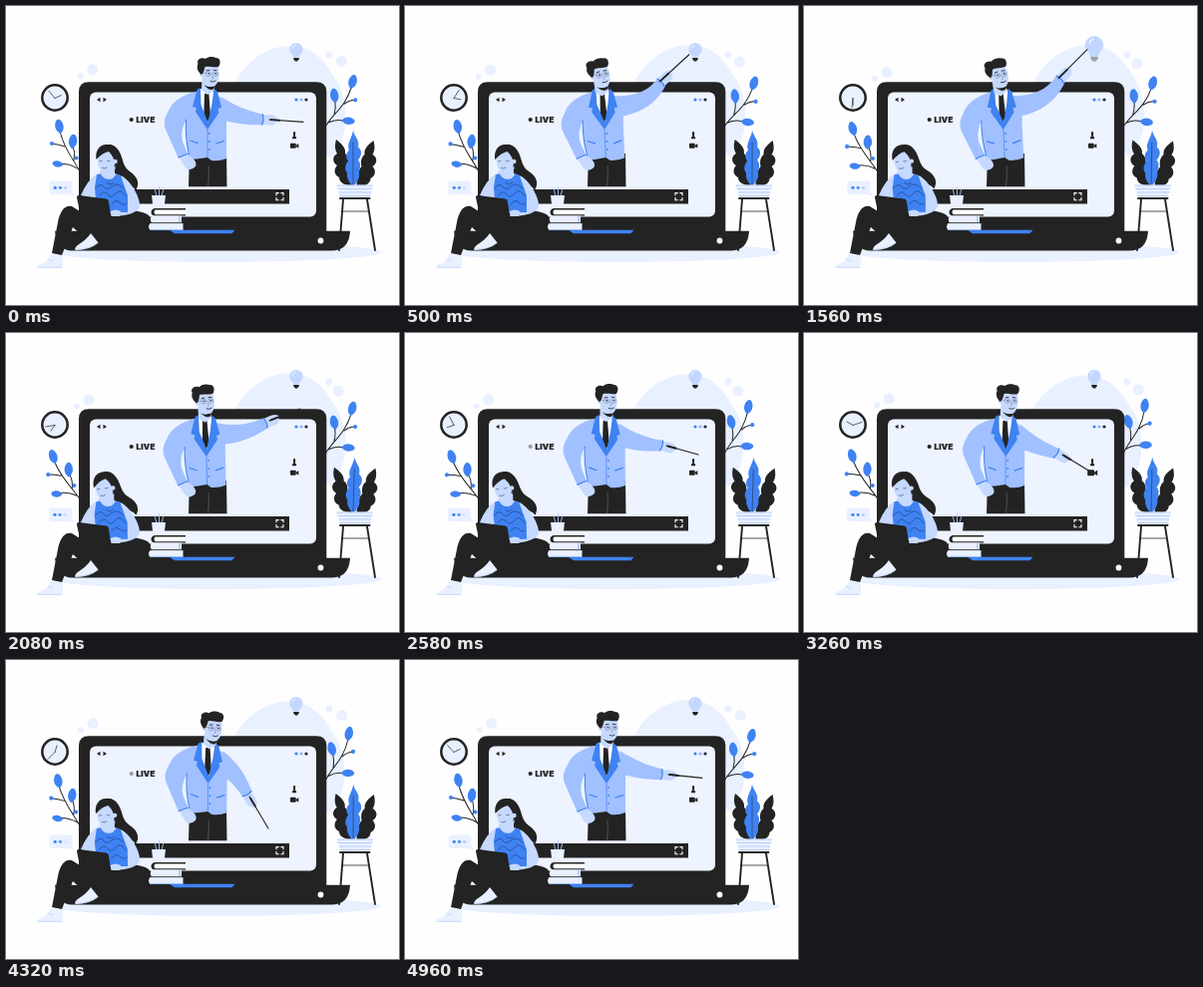
These frames come from a looping animation (394 px wide and 300 px high, 4.98 s). An HTML page:

```html
<!DOCTYPE html>
<html lang="en">
<head>
<meta charset="utf-8">
<title>Live lesson</title>
<style>
  html, body { margin: 0; width: 100%; height: 100%; overflow: hidden; background: #fefeff; }
  svg { display: block; width: 394px; height: 300px; }
  .ink { fill: #232323; } .blue { fill: #3f82f2; } .coat { fill: #a1c0ff; }
  .skin { fill: #c6d9ff; } .pale { fill: #e9f0ff; } .white { fill: #fff; }
  .line { fill: none; stroke: #232323; stroke-linecap: round; stroke-linejoin: round; }
  .trim { fill: none; stroke: #3f82f2; stroke-linecap: round; }
  .soft { stroke: #a3c0fb; }
  text { font: 900 8px Inter, Roboto, sans-serif; letter-spacing: .25px; stroke: #232323; stroke-width: .2; }
</style>
</head>
<body>
<svg viewBox="0 0 394 300">
  <defs>
    <path id="leaf" d="M0 7.200C-5.500 3.500-5-3-1.700-6.800Q0-8 1.700-6.800C5-3 5.500 3.500 0 7.200Z"/>
    <path id="spike" d="M0 0C1 7 7 9 5 17C10 21 8 27 5 30C9 35 6 39 6 43C7 49 3 53 0 57C-3 53-7 49-6 43C-9 39-8 35-5 31C-8 27-7 23-4 20C-7 14-1 8 0 0Z"/>
    <path id="frond" d="M331 134C336 138 341 142 340 148C344 151 344 157 343 160C347 164 348 172 348 181C341 180 334 178 334 172C328 169 329 163 332 160C326 156 328 150 332 148C329 143 330 138 331 134Z"/>
  </defs>

  <!-- backdrop -->
  <g class="pale">
    <path id="blob" d="M227 82C239 55 262 40 285 40C312 41 322 60 332 76C343 94 346 132 325 153L300 120Z"/>
    <ellipse cx="211" cy="247" rx="165" ry="10"/>
    <g id="bubL"><circle r="5.500"/><circle cx="-12" cy="6.500" r="3"/></g>
    <circle cx="324" cy="49" r="3.400"/>
    <circle id="bubR" r="5.500"/>
  </g>

  <!-- bulb -->
  <g id="bulb">
    <path fill="#c3d6ff" d="M288 51.500C288 48.500 284.400 47.500 284.400 43.500A6.600 6.600 0 0 1 297.600 43.500C297.600 47.500 294 48.500 294 51.500Z"/>
    <path d="M287.500 42.500Q288 39.500 290.500 39.300" fill="none" stroke="#fff" stroke-width=".8"/>
    <path id="cap" class="ink" d="M288.300 52H293.700V53.500L292 55.400H290L288.300 53.500Z"/>
  </g>

  <!-- clock -->
  <circle class="pale" cx="49" cy="92" r="12.700" stroke="#232323" stroke-width="2.500"/>
  <g class="line" stroke-width=".65">
    <path id="hour" d="M49 92.500V85.500"/>
    <path id="minute" d="M49 92.500V83"/>
  </g>

  <!-- sprigs -->
  <g id="sprigL" class="blue">
    <path class="line" stroke-width="1" d="M76 171C71 157 60 148 54 126M68 155Q70 147 67 140M59 141Q53 139 46 138M72 163Q64 158 55 158"/>
    <use href="#leaf" transform="translate(53.500 121) rotate(-10)"/>
    <use href="#leaf" transform="translate(67 136) rotate(8)"/>
    <use href="#leaf" transform="translate(52 158.500) rotate(-78) scale(.75)"/>
    <circle cx="46" cy="138" r="2.100"/><circle cx="70.500" cy="152.500" r="2"/>
  </g>
  <g id="sprigR" class="blue">
    <path class="line" stroke-width="1" d="M318 125C326 108 339 104 346 81M329 108Q331 100 329 94M339 98Q344 94 350 94M323 117Q331 113 338 115"/>
    <use href="#leaf" transform="translate(347 76) rotate(14)"/>
    <use href="#leaf" transform="translate(329 90) rotate(-10)"/>
    <use href="#leaf" transform="translate(343 115) rotate(95) scale(.9)"/>
    <circle cx="350" cy="94" r="2.100"/>
  </g>

  <!-- potted plant and stool -->
  <g id="fernL"><use class="ink" href="#frond"/></g>
  <g id="fernR"><use class="ink" href="#frond" transform="translate(699.500 1) scale(-1 1)"/></g>
  <g id="fernM">
    <use class="blue" href="#spike" transform="translate(348 124.500)"/>
    <path class="line" stroke-width=".5" d="M348 137V180"/>
  </g>
  <path class="pale" d="M331.500 179.500H368V183.500H366.500L365 193H335L333.500 183.500H331.500Z"/>
  <path class="trim soft" stroke-width=".7" d="M332 180H367.500M333 183.500H366.500M334 187H366M335 190.500H365"/>
  <path class="line" stroke-width="1.900" d="M335 193H364.500M338 194L334 245M362 194L370 245"/>
  <path class="line" stroke-width=".8" d="M337 206H363.500"/>

  <!-- laptop -->
  <path class="ink" d="M73 228V86Q73 76.200 83 76.200H311Q321.300 76.200 321.300 86V228Z"/>
  <path class="ink" d="M49 225.700H345Q344 245.500 326 245.500H66Q52 245.500 49 225.700Z"/>
  <rect x="84" y="86.500" width="227" height="125" rx="6" fill="#edf3ff"/>
  <path class="blue" d="M164 224.700H229.500L226.500 228.200H169Z"/>
  <circle class="white" cx="315.500" cy="235.500" r="2.900"/>
  <g class="ink">
    <path d="M94.500 91.800V96.200L91 94ZM97.500 91.800V96.200L101 94Z"/>
    <circle id="rec" cx="125.700" cy="114" r="2.100"/>
    <text x="130.500" y="117">LIVE</text>
    <circle cx="301" cy="94" r="1.600"/>
    <circle class="blue" cx="291" cy="94" r="1.600"/>
    <circle cx="296" cy="94" r="1.600" fill="#8fb4fb"/>
    <rect x="106" y="184" width="178" height="14.500"/>
    <rect x="288" y="126" width="2.100" height="5" rx="1"/>
    <path d="M287 131.500Q289 130 291.100 131.500V133.300H287Z"/>
    <g id="cam"><rect x="285" y="137.700" width="5.700" height="5" rx=".8"/><path d="M290.500 140L293.300 138V142.600L290.500 141Z"/></g>
  </g>
  <path d="M271 190.300V187.600H273.700M275.400 187.600H278V190.300M278 192V194.700H275.400M273.700 194.700H271V192" fill="none" stroke="#fff" stroke-width="1.100"/>

  <!-- teacher -->
  <path class="ink" d="M184 148H221L221.500 181.300H183Z"/>
  <path d="M203 160Q204 169 202.500 181.300" fill="none" stroke="#65708a" stroke-width=".6"/>
  <path id="sleeve" class="coat"/>
  <g id="torso">
    <path class="coat" d="M190 86C178 89 167 95 163 105C159 112 157 118 161 126L173 153L182 149L181 154Q191 154 202 152L206 155Q214 156 221 153L221 118C222 107 222 97 213 90Z"/>
    <path fill="#edf3ff" d="M179.500 116Q174.500 127 177 136L182.500 149L184 150Q180 132 181 117Z"/>
    <path class="trim" stroke-width="1.100" d="M180.500 114Q179.500 132 183.500 149M173 152L182 148.500"/>
    <path class="skin" d="M174 153L182 149.500C188 152 192 157 190 161C186 165 181 165 179 161Z"/>
    <path class="white" d="M195 83L208 84L208 97L202 119L194 98Z"/>
    <path class="ink" d="M199 88H203.400L205 110L201.800 117L198.300 110Z"/>
    <path class="blue" d="M195 82L191.500 84L187 101L191 102L190 106L202 124L202.500 117L195.500 99ZM208.500 83L212 86L216 102L212.500 103L213.500 107L202 124L202.500 117L206.500 98Z"/>
    <path class="trim" stroke-width=".7" d="M202 124L202 152"/>
    <path class="trim" stroke-width="1.300" d="M185 135L192 137.500M211 138L218.500 135.500"/>
    <g class="blue"><circle cx="204" cy="128" r=".9"/><circle cx="204" cy="136" r=".9"/><circle cx="204" cy="144" r=".9"/></g>
    <g id="head">
      <path class="skin" d="M196 72L210 75L208 85L201.500 89L195.500 84Z"/>
      <path class="ink" d="M198 79Q203 83 210 79L207.500 83.500Q203 85.500 198 79Z"/>
      <path class="skin" d="M196 61C201 56 211 57 212.500 62C214 70 213 77 208.500 80.500C202 82 197 77 196 71C193 71 192 66 196 65Z"/>
      <path class="ink" d="M195.500 69C192 66 190 62 192 58C190 54 195 51 199.500 53C203 50 208 51 210 52C215 52 215 58 212.500 61C208 62 202 60 199 61C198 64 198 67 195.500 69Z"/>
      <path class="line" stroke-width=".8" d="M200.500 64.800L203.500 64.300M207.500 64.300L210.500 64.600M204.500 75.500Q207 77 209.500 75.200"/>
      <g class="line" stroke-width=".4" style="stroke:#55617d"><circle cx="202.500" cy="68" r="2.500"/><circle cx="209.300" cy="68" r="2.400"/><path d="M200 67.500L196.500 67M206 70L207.300 72.500L206 73"/></g>
      <g class="ink"><circle cx="202.800" cy="67.800" r=".8"/><circle cx="209.500" cy="67.800" r=".8"/></g>
    </g>
  </g>
  <g id="hand">
    <path class="skin" d="M-1-4.700L5-5.200Q10-5.800 13.500-3Q15.500-1 13-.5Q14.500 2 12 3Q11 5.500 8 5.200L3 5.200L-1 4.700Z"/>
    <path class="trim" stroke-width="1.300" d="M-1-5Q1 0-1 5"/>
  </g>
  <path id="rod" class="line" stroke-width="1.100"/>
  <path id="grip" class="line" stroke-width="1.900"/>

  <!-- books and pencils -->
  <g class="white">
    <path class="line" style="stroke:#a9c4fa" stroke-width=".9" d="M151 191L149 183M153.500 191V181.500M156 191L158 183"/>
    <path class="pale" d="M146 190H160L158.500 203H147.500Z"/>
    <path class="ink" d="M149 203H180V210.500H149Q145.500 210 145.500 206.700Q146 203.500 149 203Z"/>
    <path d="M149.500 204.500H180V209.200H149.500Q147.500 206.800 149.500 204.500Z"/>
    <path class="pale" d="M146 210.500H176V217.500H146Q143.500 214 146 210.500Z"/>
    <path class="pale" d="M144.500 218H177.500V225H144.500Q141.500 221.500 144.500 218Z"/>
    <path class="line" stroke-width=".6" d="M145.500 217.700H177.500"/>
    <path class="trim" stroke-width=".6" d="M145 224.700H177M174 211V217"/>
  </g>

  <!-- chat bubble -->
  <g id="chat">
    <path class="pale" d="M46 175.500H63.500Q66.500 175.500 66.500 178.500V186L69 190.500L63 189H46Q43.500 189 43.500 186.500V178.500Q43.500 175.500 46 175.500Z"/>
    <g id="dots" class="blue"><circle cx="49.300" cy="182.300" r="1.600"/><circle cx="54.500" cy="182.300" r="1.600"/><circle cx="59.700" cy="182.300" r="1.600"/></g>
  </g>

  <!-- student -->
  <path class="ink" d="M98 207C122 203 138 206 143 210C149 217 126 226 108 232L90 242L81 233L100 219Z"/>
  <path class="ink" d="M102 210L102 228C88 234 76 231 67 222L56 250L46 248L52 217C54 206 59 199 66 201L82 211Z"/>
  <path class="pale" d="M45 248.500L56.500 250.500Q58 257 56 263H32Q30 260 36 258.500Q43 255 45 248.500Z"/>
  <path class="trim soft" stroke-width=".5" d="M32 262.300H56M42 254L47 256"/>
  <path class="pale" d="M85 228L92.500 237.500Q84 245 69.500 245Q68 242 74 238.500Q81 234 85 228Z"/>
  <path class="trim soft" stroke-width=".5" d="M70 244.300Q84 244 92 238"/>
  <g id="student">
    <g id="hair"><path class="ink" d="M92 149C94 138 107 135 113 145C118 153 116 160 124 166C133 172 134 179 130 185C126 178 115 179 109 170Z"/></g>
    <path class="skin" d="M91 168.500Q82 174 75 190L90 196L95 180ZM98 161H109V168L117 171C126 177 135 193 134 201C132 209 116 211 106 211L106 206L122 201L116 186L96 180L91 170Z"/>
    <path class="blue" d="M89 182L91 169L95 168.500Q99 176 107 173L111 168.500L115 170Q119 182 122 190L122 207H91Z"/>
    <path class="line" style="stroke:#1f3f80" stroke-width=".65" d="M90 183Q94 177 98 181Q101 186 106 181T118 183M94 190Q97 184 102 189Q105 194 110 188T120 191M106 199Q110 193 114 197T121 198M101 177Q104 181 108 177"/>
    <g id="face">
      <path class="skin" d="M92 149C94 143 107 141 110 148L110 163Q103 168 97.500 167Q91 163 92 149Z"/>
      <path class="ink" d="M90.500 154C89 144 95 138 102 139C112 139 115 149 114 156C114 161 118 164 118 169Q111 168 109 159Q109 152 103 146Q97 147 90.500 154Z"/>
      <path class="line" stroke-width=".5" d="M93.800 155.500Q95 156.500 96.200 155.500M101.500 155.500Q103 156.500 104.500 155.300M96.500 162.300Q99 164 101 162"/>
      <circle class="skin" cx="109.500" cy="156" r="2.200"/>
      <circle cx="110.700" cy="160.500" r="1.900" fill="none" stroke="#232323" stroke-width=".7"/>
    </g>
  </g>
  <path class="ink" d="M73 190L100.500 193.500Q102.300 193.800 102.700 195.500L106 215.500H78Q76 215.500 75.500 213.500L71 192Q71 189.800 73 190Z"/>
  <path class="skin" d="M104.500 206Q110 203 115 206L114 211L105.500 211Z"/>
</svg>

<script>
const LOOP = 4980, TAU = Math.PI * 2;
const $ = id => document.getElementById(id);
const set = (id, name, value) => $(id).setAttribute(name, value);
const turn = (id, deg, x, y) => set(id, 'transform', `rotate(${deg} ${x} ${y})`);
const move = (id, x, y) => set(id, 'transform', `translate(${x} ${y})`);
const grow = (id, k, x, y) => set(id, 'transform', `translate(${x} ${y}) scale(${k}) translate(${-x} ${-y})`);
const clamp = x => Math.max(0, Math.min(1, x));
const smooth = x => { x = clamp(x); return x * x * (3 - 2 * x); };
const bump = (t, from, to) => Math.sin(Math.PI * clamp((t - from) / (to - from))) ** 2;

// elbow, wrist, rod start, rod tip, lean
const POSES = {
  level:  [233, 112, 258, 114, 264, 114, 298, 116.5, 0],
  bulb:   [244, 99, 257, 72, 254, 72, 283, 42, -10],
  lower:  [236, 104, 261, 90, 264, 88, 295, 76, -5],
  across: [232, 112, 258, 113, 262, 113, 294, 122, -1],
  camera: [230, 114, 254, 121, 259, 122, 287, 139, 1],
  rest:   [231, 112, 242, 135, 244, 137, 263, 169, 3]
};
const KEYS = [
  [0, 'level'], [640, 'bulb'], [1450, 'bulb'], [2080, 'lower'], [2580, 'across'],
  [3000, 'camera'], [3400, 'camera'], [4120, 'rest'], [4340, 'rest']
].map(([t, name]) => ({ t, v: POSES[name] }));

function keyAt(i) {
  const n = KEYS.length, k = KEYS[(i + n) % n];
  return { t: k.t + Math.floor(i / n) * LOOP, v: k.v };
}

// slope that never overshoots a key
function slope(i, c) {
  const a = keyAt(i - 1), b = keyAt(i), d = keyAt(i + 1);
  const l = (b.v[c] - a.v[c]) / (b.t - a.t), r = (d.v[c] - b.v[c]) / (d.t - b.t);
  return l * r <= 0 ? 0 : 2 * l * r / (l + r);
}

function poseAt(t) {
  let i = KEYS.length - 1;
  while (KEYS[i].t > t) i--;
  const a = keyAt(i), b = keyAt(i + 1), h = b.t - a.t, u = (t - a.t) / h;
  return a.v.map((p, c) => {
    const q = b.v[c], s = u * u * (3 - 2 * u);
    return p + (q - p) * s + h * (u * (1 - u) ** 2 * slope(i, c) - u * u * (1 - u) * slope(i + 1, c));
  });
}

// tapered sleeve along a quadratic curve
function sleeve(sx, sy, ex, ey, wx, wy) {
  const top = [], low = [], N = 14;
  for (let i = 0; i <= N; i++) {
    const u = i / N, v = 1 - u;
    const x = v * v * sx + 2 * u * v * ex + u * u * wx;
    const y = v * v * sy + 2 * u * v * ey + u * u * wy;
    const dx = v * (ex - sx) + u * (wx - ex), dy = v * (ey - sy) + u * (wy - ey);
    const w = (11 - 5.7 * u) / Math.hypot(dx, dy);
    top.push(`${x + dy * w} ${y - dx * w}`);
    low.unshift(`${x - dy * w} ${y + dx * w}`);
  }
  return 'M' + top.concat(low).join('L') + 'Z';
}

function teacher(t) {
  const [ex, ey, wx, wy, ax, ay, bx, by, lean] = poseAt(t);
  turn('torso', lean * .27, 202, 170);
  set('head', 'transform', `translate(${lean * .15 + .5} ${Math.abs(lean) * .12}) rotate(${lean} 203 86)`);
  set('sleeve', 'd', sleeve(211 + lean * .33, 101, ex, ey, wx, wy));
  const at = k => `${ax + (bx - ax) * k} ${ay + (by - ay) * k}`;
  set('rod', 'd', `M${at(0)}L${at(1)}`);
  set('grip', 'd', `M${at(.05)}L${at(.3)}`);
  const deg = Math.atan2(by - ay, bx - ax) * 360 / TAU;
  set('hand', 'transform', `translate(${wx} ${wy}) rotate(${deg})`);
}

function draw(t) {
  const a = t / LOOP * TAU, sway = Math.cos(a), drift = Math.sin(a + .3);
  turn('hour', 65 + 360 * t / LOOP, 49, 92.5);
  turn('minute', 320 + 720 * t / LOOP, 49, 92.5);
  move('blob', (drift - .3) * 1.6, (.3 - drift) * 1.9);
  turn('sprigL', (sway - 1) * 4.1, 74, 168);
  turn('sprigR', (drift - .2) * 5.8, 320, 121);
  turn('fernL', (sway - 1) * 1.3, 347, 181);
  turn('fernM', (1 - sway) * .8, 348, 181);
  turn('fernR', (1 - sway) * 1.3, 352, 181);
  move('bubL', 85 + 2.2 * Math.cos(a + .7), 65.3 - 1.8 * Math.cos(a + .4));
  move('bubR', 335 + 1.6 * Math.cos(a + .7), 56.7 - 1.4 * Math.cos(a + .4));
  move('chat', (sway - 1) * .2, 0);
  turn('face', (sway - 1) * 2.6, 104, 172);
  turn('hair', (sway - 1) * 2, 104, 172);
  turn('student', (sway - 1) * .5, 105, 207);

  const beat = t / LOOP * 3 % 1, pulse = .5 - .5 * Math.cos(TAU * beat);
  set('rec', 'opacity', 1 - .58 * (smooth((beat - .28) / .24) - smooth((beat - .62) / .28)));
  [...$('dots').children].forEach((dot, i) => dot.setAttribute('opacity', [1, .9, .3][i] - .1 * i * pulse));

  grow('bulb', 1 + .38 * bump(t, 1080, 2070), 291, 55);
  set('cap', 'opacity', 1 - .65 * (smooth((t - 640) / 320) - smooth((t - 1500) / 450)));
  grow('cam', 1 + .2 * bump(t, 2850, 3700), 289, 140.2);
  teacher(t);
}

const start = performance.now();
function tick() {
  draw((performance.now() - start) % LOOP);
  requestAnimationFrame(tick);
}
tick();
</script>
</body>
</html>
```
